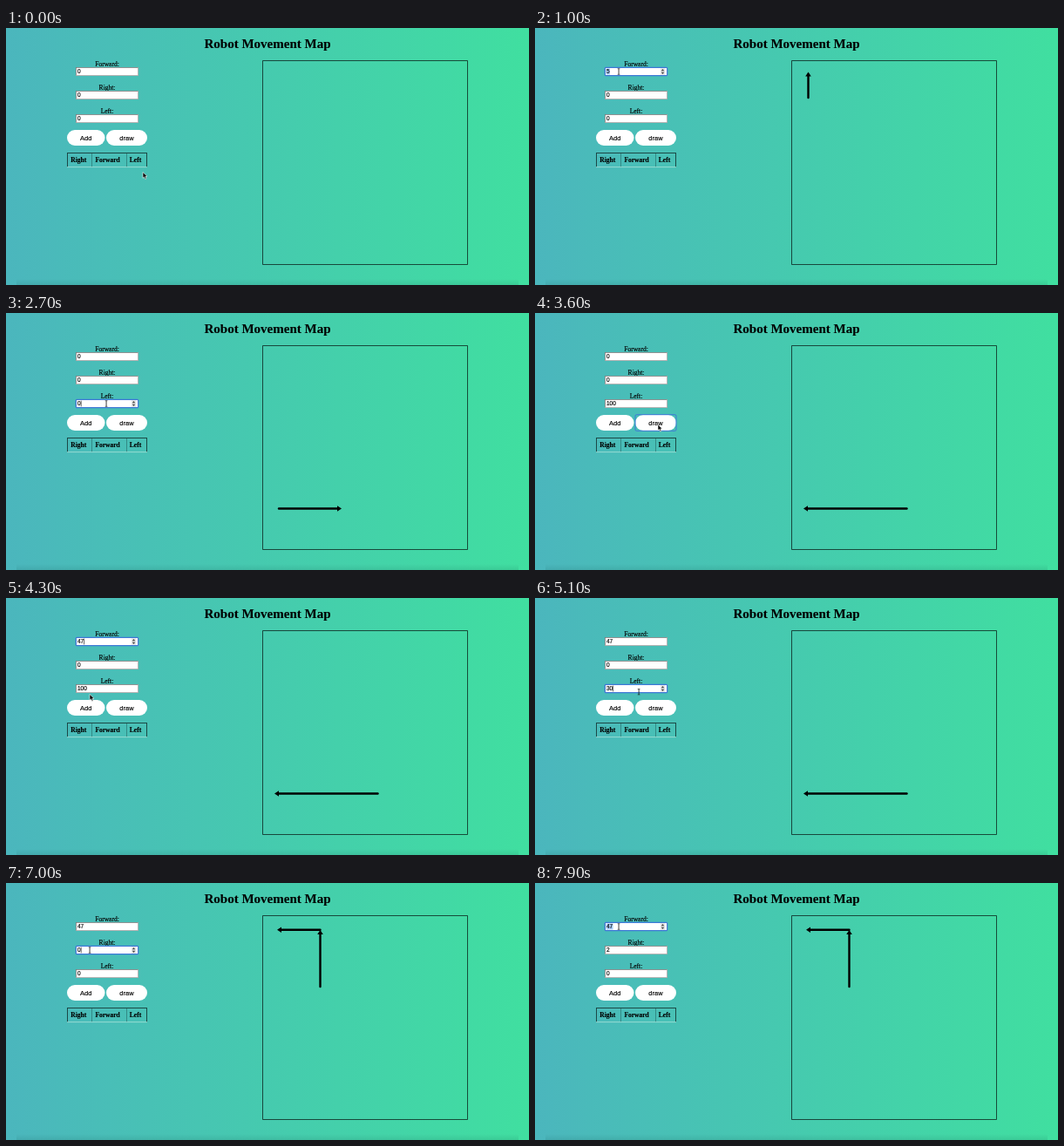
An HTML page with a canvas that plays this animation: 600x295 px, repeating every 8000 ms.

```html
<!DOCTYPE html>
<html lang="en">
<head>
<meta charset="utf-8">
<title>Robot Movement Map</title>
<style>
  html, body { margin: 0; width: 100%; height: 100%; overflow: hidden; }
  canvas { display: block; width: 600px; height: 295px; }
</style>
</head>
<body>
<canvas id="stage"></canvas>
<script>
const W = 600, H = 295, LOOP = 8000, STEP = 100;
const SERIF = '"Liberation Serif", Times, serif';
const SANS = '"Liberation Sans", Arial, sans-serif';
const BLUE = '#3f78d8';
const canvas = document.getElementById('stage');
const ctx = canvas.getContext('2d');
const scale = window.devicePixelRatio || 1;
canvas.width = W * scale;
canvas.height = H * scale;
ctx.scale(scale, scale);

const FIELD = { x: 80, w: 72, h: 10 };
const fields = ['forward', 'right', 'left'].map((key, i) => ({
  key, label: key[0].toUpperCase() + key.slice(1) + ':', y: Math.round(45 + 26.75 * i)
}));

const spots = {
  forward: [96, 50], right: [96, 77], left: [115, 104], draw: [141, 128],
  table: [152, 148.5], belowTable: [167, 177], aboveAdd: [96, 110.5], aboveTable: [164, 144],
  start: [157, 165.5]
};

// Each arrow: tail x, y, direction, length
const UP = -Math.PI / 2, RIGHT = 0, LEFT = Math.PI;
const drawings = {
  up: [[313.5, 80, UP, 29.5]],
  right: [[313, 224.5, RIGHT, 72]],
  left: [[426.5, 224.5, LEFT, 118.5]],
  corner: [[360.5, 119, UP, 65], [360.5, 53.7, LEFT, 49.5]]
};

// The pointer reaches a spot at one time and leaves it at another.
// In a field the entry is typed just before leaving; on "draw" it names the drawing.
const visit = (spot, at, until = at, entry = '') => ({ spot, at, until, entry });
const visits = [
  visit('start', 0),
  visit('forward', 300, 500, '5'),
  visit('draw', 700, 700, 'up'),
  visit('forward', 900, 1200, '0'),
  visit('right', 1400, 1600, '50'),
  visit('draw', 1800, 1900, 'right'),
  visit('right', 2200, 2400, '0'),
  visit('left', 2600, 2900, '100'),
  visit('left', 3000),
  visit('draw', 3400, 3600, 'left'),
  visit('forward', 3900, 4200, '47'),
  visit('aboveAdd', 4300),
  visit('left', 4600, 5000, '30'),
  visit('draw', 5400, 5800, 'corner'),
  visit('table', 5900),
  visit('belowTable', 6200),
  visit('left', 6600, 6800, '0'),
  visit('right', 6900, 7200, '2'),
  visit('right', 7400),
  visit('aboveTable', 7600),
  visit('forward', 7900, 8100, '47')
];

function stateAt(time) {
  const state = { forward: '0', right: '0', left: '0', focus: '', selected: false, drawing: '' };
  for (const { spot, at, until, entry } of visits) {
    if (at > time) break;
    if (spot === 'draw') {
      state.focus = spot;
      state.drawing = entry;
    } else if (spot in state) {
      const typed = Math.min(1, (time - until) / (2 * STEP) + 1);
      const typing = entry && time >= until - STEP;
      state.focus = spot;
      state.selected = entry !== '' && !typing && state[spot] !== '0';
      if (typing) state[spot] = entry.slice(0, Math.ceil(entry.length * typed));
    }
  }
  return state;
}

function pointerAt(time) {
  const next = visits.findIndex(v => v.at > time);
  const from = visits.at(next < 0 ? -1 : next - 1), to = visits[next];
  if (!to || time <= from.until) return spots[from.spot];
  const p = (time - from.until) / (to.at - from.until), ease = p * p * (3 - 2 * p);
  return spots[from.spot].map((start, i) => start + (spots[to.spot][i] - start) * ease);
}

function text(str, x, y, font, align = 'left') {
  ctx.font = font;
  ctx.textAlign = align;
  ctx.fillStyle = ctx.strokeStyle = '#000';
  ctx.lineWidth = .15;
  ctx.fillText(str, x, y);
  ctx.strokeText(str, x, y);
}

function rect(x, y, w, h, color) {
  ctx.fillStyle = color;
  ctx.fillRect(x, y, w, h);
}

function outline(x, y, w, h, color, width, radius = 0) {
  ctx.beginPath();
  ctx.roundRect(x, y, w, h, radius);
  ctx.strokeStyle = color;
  ctx.lineWidth = width;
  ctx.stroke();
}

function polygon(points, color) {
  ctx.beginPath();
  points.forEach(([x, y]) => ctx.lineTo(x, y));
  ctx.closePath();
  ctx.fillStyle = color;
  ctx.fill();
}

function background() {
  const sky = ctx.createLinearGradient(0, 0, W, 0);
  sky.addColorStop(0, '#4bb6bd');
  sky.addColorStop(1, '#40dfa0');
  rect(0, 0, W, H, sky);
  const shade = ctx.createLinearGradient(0, 288, 0, H);
  shade.addColorStop(0, 'rgba(0,50,50,0)');
  shade.addColorStop(1, 'rgba(0,50,50,.1)');
  rect(12, 288, 576, 7, shade);
}

function spinner(x, y) {
  rect(x - 2.5, y - 3.8, 5, 7.6, '#e4e4e4');
  for (const side of [-1, 1]) {
    polygon([[x - 1.7, y + .7 * side], [x, y + 3 * side], [x + 1.7, y + .7 * side]], '#444');
  }
}

function field({ key, label, y }, state) {
  const { x, w, h } = FIELD, focused = state.focus === key, value = state[key];
  const font = `6.5px ${SANS}`;
  text(label, 116, y - 1.2, `7.5px ${SERIF}`, 'center');
  rect(x, y, w, h, '#aaa');
  rect(x, y, w - .8, h - .8, '#777');
  rect(x + .8, y + .8, w - 1.6, h - 1.6, '#fff');
  if (focused) outline(x + .3, y + .3, w - .6, h - .6, BLUE, 1.2, 1);
  ctx.font = font;
  const end = 82 + ctx.measureText(value).width;
  if (focused && state.selected) rect(81.7, y + 1.5, end - 81.4, 7, '#a9cdfb');
  text(value, 82, y + 7.4, font);
  if (!focused) return;
  if (!state.selected) rect(end + .2, y + 1.6, .6, 6.8, '#000');
  spinner(146.5, y + h / 2);
}

function button(label, x, w, focused) {
  ctx.beginPath();
  ctx.roundRect(x, 117, w, 18, 9);
  ctx.fillStyle = '#fff';
  ctx.fill();
  text(label, x + w / 2, 128.6, `7.5px ${SANS}`, 'center');
  if (focused) outline(x, 116.7, w, 18.6, BLUE, 1, 1.5);
}

function table() {
  const dark = 'rgba(0,0,0,.62)', mid = 'rgba(20,60,60,.5)';
  rect(70, 143, 92, 1, dark);
  for (const x of [70, 161]) rect(x, 144, 1, 15.5, dark);
  for (const x of [98, 138]) rect(x, 144, .8, 15.5, mid);
  rect(70, 159.3, 92, .8, 'rgba(200,240,230,.75)');
  [['Right', 74.3], ['Forward', 102.4], ['Left', 141.8]]
    .forEach(([name, x]) => text(name, x, 154.2, `bold 7.5px ${SERIF}`));
}

function arrow([x, y, angle, length]) {
  ctx.save();
  ctx.translate(x, y);
  ctx.rotate(angle);
  ctx.beginPath();
  ctx.moveTo(0, 0);
  ctx.lineTo(length - 3, 0);
  ctx.strokeStyle = '#000';
  ctx.lineWidth = 2.4;
  ctx.lineCap = 'round';
  ctx.stroke();
  polygon([[length, 0], [length - 5, -3.3], [length - 5, 3.3]], '#000');
  ctx.restore();
}

function pointer([x, y]) {
  const overField = fields.some(f =>
    x > FIELD.x && x < FIELD.x + FIELD.w && y > f.y && y < f.y + FIELD.h);
  ctx.save();
  ctx.translate(x, y);
  if (overField) {
    rect(-.35, -3.2, .8, 6.4, '#111');
    for (const end of [-3.5, 2.9]) rect(-1.3, end, 2.7, .6, '#111');
  } else {
    polygon([[0, 0], [0, 6.8], [1.6, 5.4], [2.7, 8], [4, 7.4], [2.9, 4.9], [5, 4.8]], '#000');
    ctx.strokeStyle = '#fff';
    ctx.lineWidth = .6;
    ctx.stroke();
  }
  ctx.restore();
}

function render(time) {
  const state = stateAt(time);
  background();
  text('Robot Movement Map', 300, 23, `bold 15px ${SERIF}`, 'center');
  fields.forEach(f => field(f, state));
  button('Add', 70, 43.5, false);
  button('draw', 115, 47, state.focus === 'draw');
  table();
  outline(294.5, 37.5, 235, 234, 'rgba(0,0,0,.65)', 1);
  (drawings[state.drawing] || []).forEach(arrow);
  pointer(pointerAt(time));
}

const begin = performance.now();
function tick() {
  const time = (performance.now() - begin) % LOOP;
  render(Math.floor(time / STEP) * STEP);
  requestAnimationFrame(tick);
}
tick();
</script>
</body>
</html>
```
